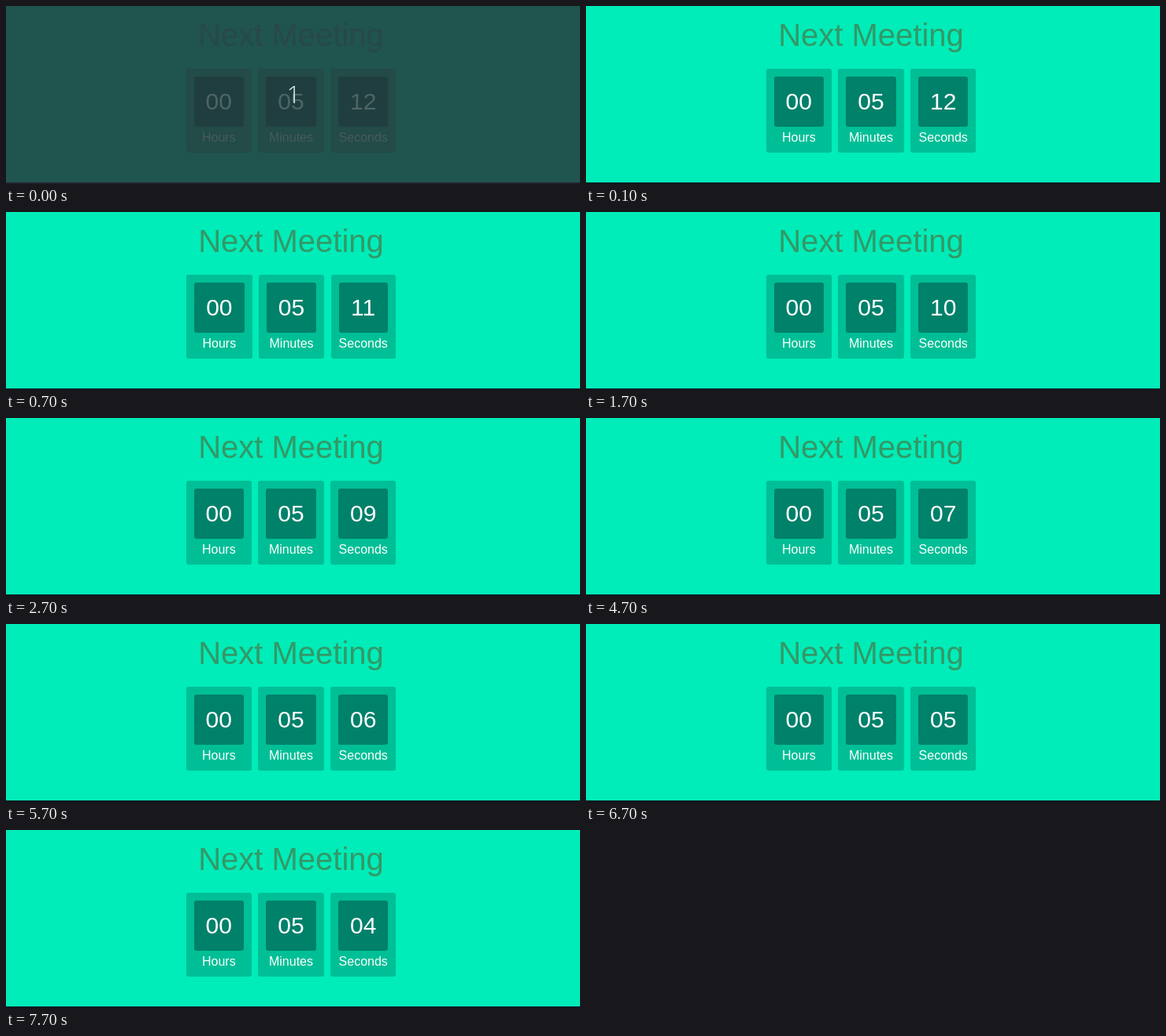
Animation of 729x227 px, one loop 8 s. Source, as an HTML page:

```html
<!DOCTYPE html>
<html lang="en">
<head>
<meta charset="utf-8">
<title>Next Meeting</title>
<style>
  html, body { margin: 0; width: 100%; height: 100%; overflow: hidden; }
  #stage {
    --back: #00ecb9; --title: #339966; --box: #00bf96; --face: #00816a;
    --digit: #fff; --label: #fff; --edge: #101c22;
    position: relative; width: 729px; height: 227px;
    background: var(--back);
    font-family: "Liberation Sans", Arial, sans-serif;
  }
  #stage.dim {
    --back: #20544f; --title: #28484a; --box: #234b47; --face: #203e3f;
    --digit: #506466; --label: #475a5d; --edge: #23222d;
  }
  h1, .clock { position: absolute; left: 0; width: 724px; margin: 0; text-align: center; }
  h1 { top: 15px; font-size: 40px; line-height: 44px; font-weight: 400; color: var(--title); }
  .clock { top: 80px; display: flex; justify-content: center; gap: 8.34px; }
  .box { padding: 10px; border-radius: 3px; background: var(--box); }
  .value {
    padding: 15px; border-radius: 3px; background: var(--face);
    color: var(--digit); font-size: 30px; line-height: 34px;
  }
  .label { padding-top: 5px; font-size: 16px; line-height: 18px; color: var(--label); }
  .edge { position: absolute; left: 0; bottom: 0; width: 100%; height: 2px; background: var(--edge); }
  svg { position: absolute; left: 0; top: 0; visibility: hidden; }
  .dim svg { visibility: visible; }
  svg text { font: 300 31px "Open Sans", sans-serif; fill: #e4f6f1; }
</style>
</head>
<body>
<div id="stage">
  <h1>Next Meeting</h1>
  <div class="clock">
    <div class="box"><div class="value">00</div><div class="label">Hours</div></div>
    <div class="box"><div class="value">05</div><div class="label">Minutes</div></div>
    <div class="box"><div class="value" id="seconds">12</div><div class="label">Seconds</div></div>
  </div>
  <div class="edge"></div>
  <svg width="729" height="227"><text x="356.5" y="124">1</text></svg>
</div>
<script>
  const LOOP = 8000, DIM_END = 100, FIRST_TICK = 700, START = 12;
  const stage = document.getElementById("stage");
  const seconds = document.getElementById("seconds");
  const begin = performance.now();

  function draw() {
    const t = (performance.now() - begin) % LOOP;
    const ticks = Math.floor((t - FIRST_TICK) / 1000) + 1;
    const text = String(START - ticks).padStart(2, "0");
    stage.classList.toggle("dim", t < DIM_END);
    if (seconds.textContent !== text) seconds.textContent = text;
    requestAnimationFrame(draw);
  }
  draw();
</script>
</body>
</html>
```
